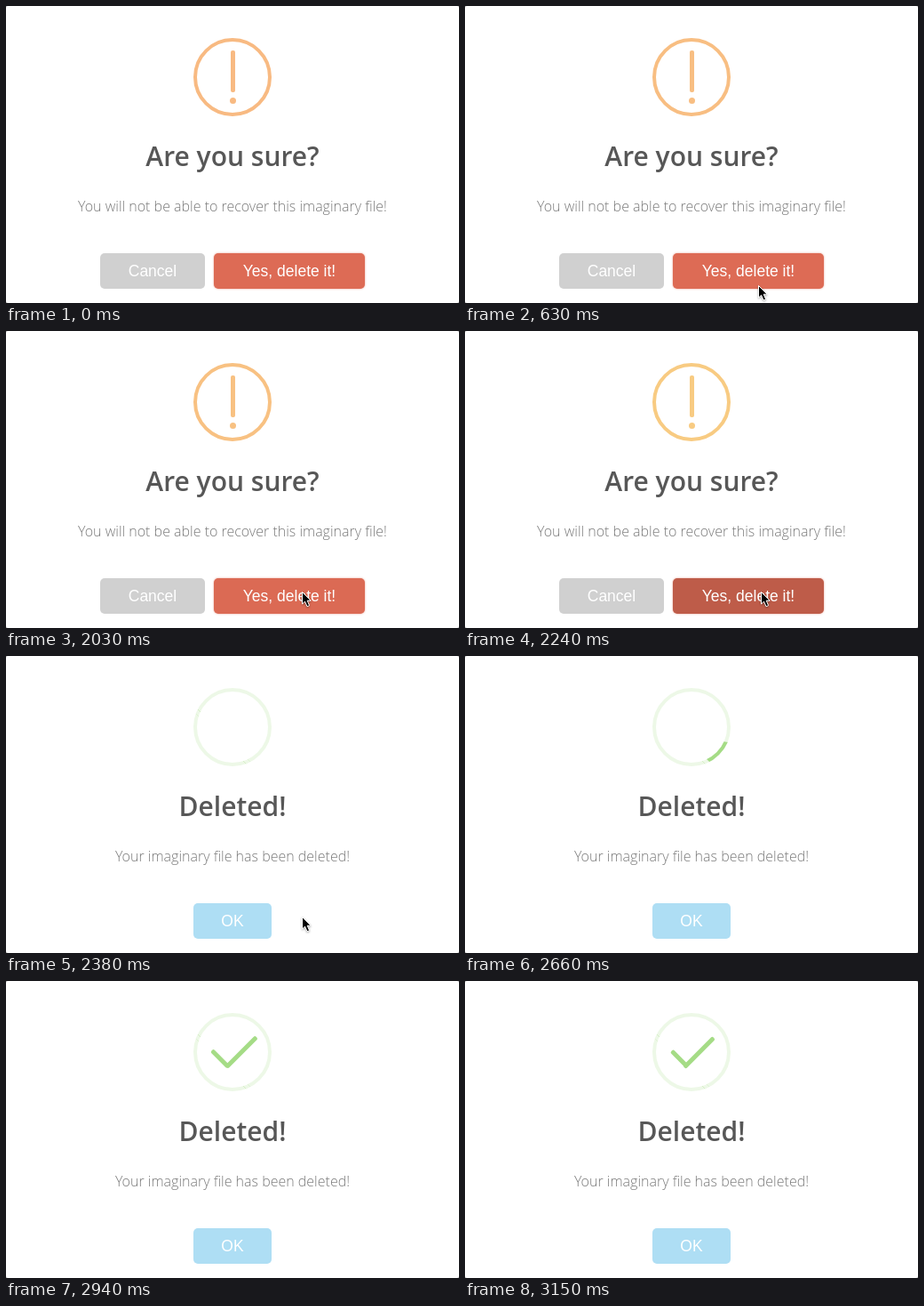
Recreate the animation shown at these times as an HTML page. Size 510 by 334 pixels, loop 4130 ms.

```html
<!DOCTYPE html>
<html lang="en">
<head>
<meta charset="utf-8">
<title>Confirm dialog</title>
<style>
  html, body { margin: 0; width: 100%; height: 100%; overflow: hidden; background: #999; }
  svg { display: block; width: 510px; height: 334px; }
  text { text-anchor: middle; }
  .title { font: 600 30px "Open Sans", sans-serif; fill: #575757; }
  .note { font: 300 16px "Open Sans", sans-serif; fill: #797979; }
  .label { font: 17.5px "Liberation Sans", Arial, sans-serif; fill: #fff; }
  .glow { filter: drop-shadow(0 0 1px rgba(221, 107, 85, .6)); }
  .arrow { filter: drop-shadow(0 1px 1px rgba(0, 0, 0, .35)); }
</style>
</head>
<body>
<svg viewBox="0 0 510 334">
  <rect width="510" height="334" rx="2" fill="#fff"/>

  <g id="ask">
    <g id="warning">
      <circle cx="255" cy="80" r="42" fill="none" stroke="currentColor" stroke-width="4"/>
      <rect x="253" y="50" width="5" height="47" rx="2" fill="currentColor"/>
      <circle cx="255.5" cy="106.5" r="3.5" fill="currentColor"/>
    </g>
    <text class="title" x="255" y="180">Are you sure?</text>
    <text class="note" x="255" y="231">You will not be able to recover this imaginary file!</text>
    <rect x="106" y="278" width="118" height="40" rx="5" fill="#d0d0d0"/>
    <text class="label" x="165" y="304">Cancel</text>
    <rect id="confirm" class="glow" x="234" y="278" width="170" height="40" rx="5"/>
    <text class="label" x="319" y="304">Yes, delete it!</text>
  </g>

  <g id="done">
    <g transform="translate(215 40)">
      <circle cx="40" cy="40" r="42" fill="none" stroke="#a5dc86" stroke-width="4"/>
      <!-- white half discs hide the ring; the second one sweeps round -->
      <path d="M0-60A60 60 0 0 0 0 60Z" fill="#fff" transform="translate(27 53) rotate(-45)"/>
      <path id="sweep" d="M0-60A60 60 0 0 1 0 60Z" fill="#fff"/>
      <rect x="28" y="8" width="5" height="90" fill="#fff" transform="rotate(-45 30.5 53)"/>
      <circle cx="40" cy="40" r="42" fill="none" stroke="#a5dc86" stroke-opacity=".2" stroke-width="4"/>
      <rect id="tip" height="5" rx="2" fill="#a5dc86"/>
      <rect id="long" height="5" rx="2" fill="#a5dc86"/>
    </g>
    <text class="title" x="255" y="180">Deleted!</text>
    <text class="note" x="255" y="231">Your imaginary file has been deleted!</text>
    <rect x="211" y="278" width="88" height="40" rx="5" fill="#aedef4"/>
    <text class="label" x="255" y="304">OK</text>
  </g>

  <path id="cursor" class="arrow" d="M.5 .5V14L3.6 11.2L6 16.8L8.6 15.7L6.2 10.2H10.2Z"
        fill="#000" stroke="#fff" stroke-width="1"/>
</svg>
<script>
  const LOOP = 4130, STEP = 70, DELETED = 2380, SUCCESS = 2370;
  const $ = id => document.getElementById(id);
  const show = (id, on) => $(id).setAttribute("visibility", on ? "visible" : "hidden");

  // cubic-bezier easing, solved by bisection
  const bezier = (x1, y1, x2, y2) => x => {
    const at = (s, a, b) => 3 * (1 - s) ** 2 * s * a + 3 * (1 - s) * s * s * b + s ** 3;
    let lo = 0, hi = 1;
    for (let i = 0; i < 24; i++) {
      const mid = (lo + hi) / 2;
      if (at(mid, x1, x2) < x) lo = mid; else hi = mid;
    }
    return at(lo, y1, y2);
  };
  const ease = bezier(.25, .1, .25, 1);
  const easeIn = bezier(.42, 0, 1, 1);

  // keys: [position, ...values], eased separately within each segment
  function keyframes(p, keys, curve) {
    const i = keys.findIndex(k => k[0] > p);
    if (i < 0) return keys[keys.length - 1].slice(1);
    if (i === 0) return keys[0].slice(1);
    const a = keys[i - 1], b = keys[i];
    const f = curve((p - a[0]) / (b[0] - a[0]));
    return a.slice(1).map((v, j) => v + (b[j + 1] - v) * f);
  }

  const TIP = [[.54, 0, 1, 19], [.7, 50, -8, 37], [.84, 17, 21, 48], [1, 25, 14, 45]];
  const LONG = [[.65, 0, 46, 54], [.84, 55, 0, 35], [1, 47, 8, 38]];
  const SWEEP = [[.05, -45], [.12, -405]];

  function bar(id, x, y, width, angle) {
    const el = $(id);
    el.setAttribute("x", x);
    el.setAttribute("y", y);
    el.setAttribute("width", width);
    el.setAttribute("transform", `rotate(${angle} ${x + width / 2} ${y + 2.5})`);
  }

  function drawAsk(t) {
    const green = t < 630 ? 186 : t < 1120 ? 190 : t < 2240 ? 193 : 203;
    $("warning").setAttribute("color", `rgb(248,${green},130)`);
    $("confirm").setAttribute("fill", t < 2030 ? "#dd6b55" : t < 2240 ? "#db6a54" : "#be5c49");
  }

  function drawDone(t) {
    const p = t / 750;
    const [tipW, tipX, tipY] = keyframes(p, TIP, ease);
    const [longW, right, longY] = keyframes(p, LONG, ease);
    const [angle] = keyframes(t / 4250, SWEEP, easeIn);
    bar("tip", tipX, tipY, tipW, 45);
    bar("long", 80 - right - longW, longY, longW, -45);
    $("sweep").setAttribute("transform", `translate(30 49) rotate(${angle})`);
  }

  function drawCursor(t) {
    const left = (1 - Math.min(1, Math.max(0, (t - 630) / 280))) ** 2;
    const y = t < 2590 ? 293 + 21 * left : 305;
    $("cursor").setAttribute("transform", `translate(${333 - 3 * left} ${y})`);
    show("cursor", t >= 630 && t < 2660);
  }

  function draw() {
    const t = Math.floor(performance.now() % LOOP / STEP) * STEP;
    const deleted = t >= DELETED;
    show("ask", !deleted);
    show("done", deleted);
    if (deleted) drawDone(t - SUCCESS); else drawAsk(t);
    drawCursor(t);
    requestAnimationFrame(draw);
  }
  draw();
</script>
</body>
</html>
```
